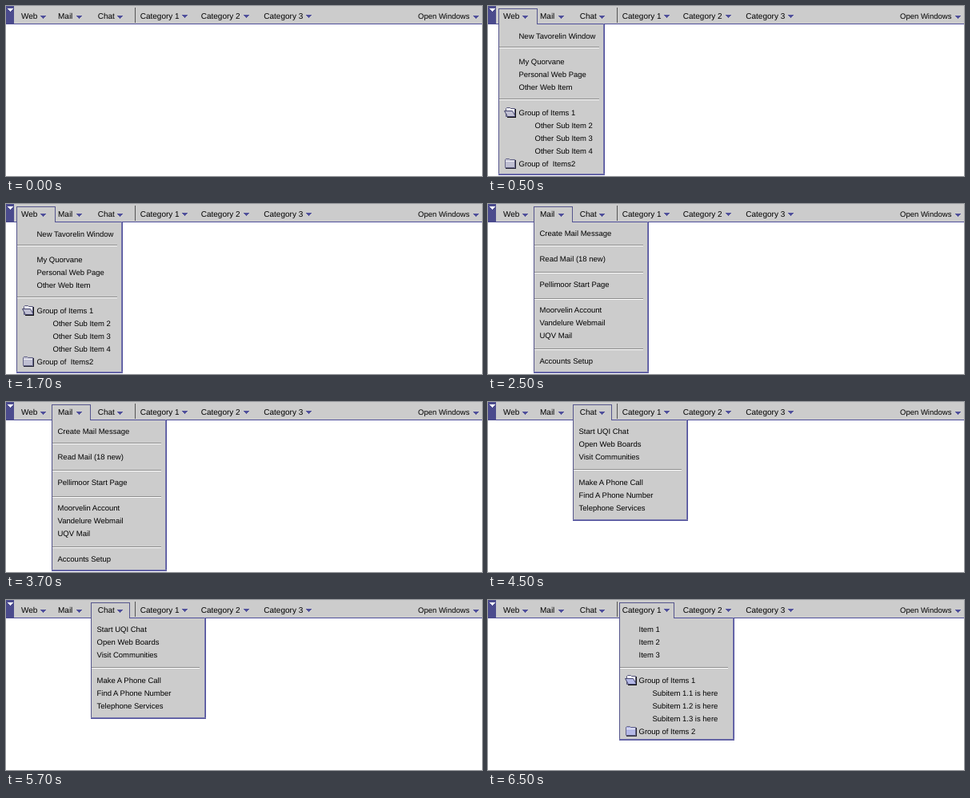
Animation, 595 px wide and 213 px high, one loop 8000 ms. Source, as an HTML page with a canvas:

```html
<!DOCTYPE html>
<html lang="en">
<head>
<meta charset="utf-8">
<title>Menu bar</title>
<style>
  html, body { margin: 0; width: 100%; height: 100%; overflow: hidden; background: #fff; }
  canvas { display: block; width: 595px; height: 213px; }
</style>
</head>
<body>
<canvas id="stage" width="595" height="213"></canvas>
<script>
const ctx = document.getElementById('stage').getContext('2d');
const W = 595, H = 213, BAR = 22, LOOP = 8000;
const GRAY = '#cccccc', PURPLE = '#4f4f9b', EDGE = '#55558c', SMALL = 9.5;

// label, text x, arrow x, arrow y, font size
const HEADS = [
  ['Web', 19, 43, 12, 10], ['Mail', 65, 88, 12, 10], ['Chat', 114.7, 139, 12, 10],
  ['Category 1', 167.7, 220, 11, 10], ['Category 2', 243.7, 297, 11, 10],
  ['Category 3', 322.3, 375, 11, 10], ['Open Windows', 515, 584, 12, SMALL]
];

// rows: [text, baseline, indent]; folders: [y, open]
const MENUS = [
  { start: 500, x: 13, tab: 49, w: 133, bottom: 212, pad: 25.5, rules: [51, 116], ruleW: 125,
    paper: '#bfbfd2', iconX: 20, folders: [[127, true], [191, false]],
    rows: [['New Tavorelin Window', 41], ['My Quorvane', 73], ['Personal Web Page', 89],
      ['Other Web Item', 105], ['Group of Items 1', 137], ['Other Sub Item 2', 153, 20],
      ['Other Sub Item 3', 169, 20], ['Other Sub Item 4', 185, 20], ['Group of  Items2', 201]] },
  { start: 2500, x: 57, tab: 49, w: 144, bottom: 212, pad: 7.5, rules: [51, 85, 118, 181], ruleW: 136,
    rows: [['Create Mail Message', 40], ['Read Mail (18 new)', 72], ['Pellimoor Start Page', 104],
      ['Moorvelin Account', 136], ['Vandelure Webmail', 152], ['UQV Mail', 168],
      ['Accounts Setup', 200]] },
  { start: 4500, x: 106, tab: 49, w: 144, bottom: 149, pad: 7.5, rules: [84], ruleW: 135,
    rows: [['Start UQI Chat', 40], ['Open Web Boards', 56], ['Visit Communities', 72],
      ['Make A Phone Call', 104], ['Find A Phone Number', 120], ['Telephone Services', 136]] },
  { start: 6500, x: 164, tab: 69, w: 144, bottom: 176, pad: 24.5, rules: [84], ruleW: 135,
    paper: '#b4b8e6', iconX: 171, folders: [[94, true], [158, false]],
    rows: [['Item 1', 40], ['Item 2', 56], ['Item 3', 72], ['Group of Items 1', 104],
      ['Subitem 1.1 is here', 120, 17], ['Subitem 1.2 is here', 136, 17],
      ['Subitem 1.3 is here', 152, 17], ['Group of Items 2', 168]] }
];

function rect(color, x, y, w, h) {
  ctx.fillStyle = color;
  ctx.fillRect(x, y, w, h);
}

function label(text, x, y, size) {
  ctx.font = size + 'px "Liberation Sans", Arial, sans-serif';
  ctx.fillStyle = '#000';
  ctx.fillText(text, x, y);
}

function arrow(color, x, y) {
  for (let i = 0; i < 4; i++) rect(color, x + i, y + i, 7 - i * 2, 1);
}

function poly(points, fill, stroke) {
  ctx.beginPath();
  points.forEach(([x, y]) => ctx.lineTo(x + 0.5, y + 0.5));
  ctx.closePath();
  ctx.fillStyle = fill;
  ctx.fill();
  ctx.strokeStyle = stroke;
  ctx.lineWidth = 1;
  ctx.stroke();
}

function folder(x, y, open, paper) {
  ctx.save();
  ctx.translate(x, y);
  if (open) {
    poly([[2, 11], [2, 1], [3, 0], [7, 0], [8, 1], [13, 1], [13, 11]], '#f4f4fa', '#55557a');
    poly([[0, 4], [10, 4], [14, 11], [4, 11]], paper, '#44446c');
    rect('#111', 4, 12, 11, 1);
    rect('#111', 14, 2, 1, 10);
  } else {
    poly([[1, 11], [1, 1], [2, 0], [6, 0], [7, 1], [13, 1], [13, 11]], paper, '#666688');
    rect('#f4f4fa', 2, 3, 11, 1);
    rect('#222233', 2, 12, 13, 1);
    rect('#222233', 14, 2, 1, 10);
  }
  ctx.restore();
}

function bar() {
  rect(GRAY, 0, 0, W, BAR);
  rect(PURPLE, 0, BAR, W, 1);
  rect('#4b4b8d', 0, 0, 10, BAR + 1);
  arrow('#fff', 2, 3);
  rect('#555', 161, 2, 1, 19);
}

function menu(m) {
  const right = m.x + m.w, tabEnd = m.x + m.tab;
  rect(GRAY, m.x, BAR + 1, m.w, m.bottom - BAR - 1);
  rect(GRAY, m.x, 3, m.tab, BAR - 2);
  rect(EDGE, m.x, 3, m.tab, 1);
  rect(EDGE, m.x, 3, 1, m.bottom - 3);
  rect(EDGE, tabEnd - 1, 3, 1, BAR - 2);
  rect('#7777ae', right - 2, BAR, 1, m.bottom - BAR);
  rect(PURPLE, right - 1, BAR, 1, m.bottom - BAR);
  rect('#7777ae', m.x, m.bottom - 2, m.w, 1);
  rect(PURPLE, m.x, m.bottom - 1, m.w, 1);

  for (const y of m.rules) {
    rect('#8c8c8c', m.x + 1, y, m.ruleW, 1);
    rect('#fff', m.x + 1, y + 1, m.ruleW, 1);
  }
  for (const [y, open] of m.folders || []) folder(m.iconX, y, open, m.paper);
  for (const [text, y, indent = 0] of m.rows) label(text, m.x + m.pad + indent, y, SMALL);
}

function draw(t) {
  rect('#fff', 0, 0, W, H);
  ctx.textRendering = 'geometricPrecision';
  bar();
  const open = MENUS.filter(m => t >= m.start).pop();
  if (open) menu(open);
  for (const [text, x, ax, ay, size] of HEADS) {
    label(text, x, 16, size);
    arrow(PURPLE, ax, ay);
  }
}

const begin = performance.now();
function tick() {
  draw((performance.now() - begin) % LOOP);
  requestAnimationFrame(tick);
}
tick();
</script>
</body>
</html>
```
